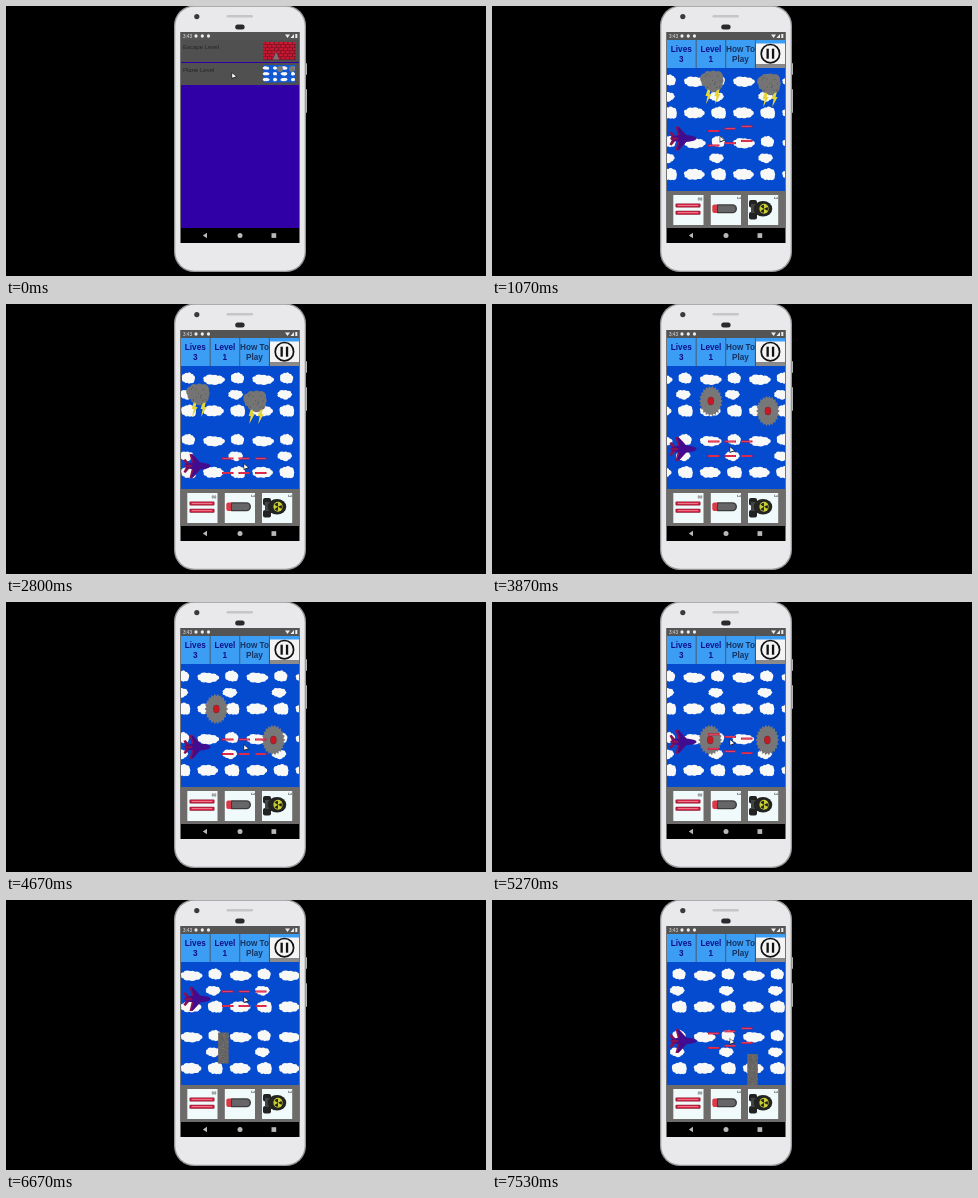
An HTML page with a canvas that plays this animation: 480x270 px, repeating every 7.59 s.

```html
<!DOCTYPE html>
<html lang="en">
<head>
<meta charset="utf-8">
<title>Plane game on a phone</title>
<style>
html, body { margin: 0; width: 100%; height: 100%; overflow: hidden; background: #000; }
canvas { display: block; }
</style>
</head>
<body>
<canvas id="stage" width="480" height="270"></canvas>
<script>
const g = document.getElementById('stage').getContext('2d');
const LOOP = 7590, START = 0.4, SPEED = 82, SPACING = 57.1, TILE = 49.1;
const TAU = Math.PI * 2;

// heights the plane flies to: [start, end, y]
const moves = [[.5, 1.9, 162], [2.9, 3.6, 145], [5.1, 5.9, 99], [6.9, 7.6, 142]];

// enemy heights in order of arrival; every four the kind changes
const heights = [80, 83, 95, 102, 97, 107, 138, 138, 148, null, 169.5];
const kinds = [storm, saw, pillar];

function ease(p) {
  p = Math.max(0, Math.min(1, p));
  return p * p * (3 - 2 * p);
}

function planeY(t) {
  return moves.reduce((y, [a, b, to]) => y + (to - y) * ease((t - a) / (b - a)), 116);
}

function random(seed) {
  const v = Math.sin(seed * 12.9898) * 43758.5453;
  return v - Math.floor(v);
}

function rect(x, y, w, h, color) {
  g.fillStyle = color;
  g.fillRect(x, y, w, h);
}

function round(x, y, w, h, r, color) {
  g.beginPath();
  g.roundRect(x, y, w, h, r);
  g.fillStyle = color;
  g.fill();
}

function oval(x, y, rx, ry, color) {
  g.beginPath();
  g.ellipse(x, y, rx, ry, 0, 0, TAU);
  g.fillStyle = color;
  g.fill();
}

function poly(color, ...p) {
  g.beginPath();
  for (let i = 0; i < p.length; i += 2) g.lineTo(p[i], p[i + 1]);
  g.closePath();
  g.fillStyle = color;
  g.fill();
}

function text(s, x, y, size, color, align = 'left', weight = '') {
  g.font = `${weight} ${size}px "Liberation Sans", Arial, sans-serif`;
  g.textAlign = align;
  g.fillStyle = color;
  g.fillText(s, x, y);
}

function at(x, y, draw) {
  g.save();
  g.translate(x, y);
  draw();
  g.restore();
}

// a ring of uneven puffs around a solid middle
function puff(x, y, w, h, seed, color = '#f8f8f6') {
  oval(x, y, w * .38, h * .36, color);
  for (let i = 0; i < 9; i++) {
    const a = i / 9 * TAU, r = .8 + .5 * random(seed * 20 + i);
    oval(x + Math.cos(a) * w * .33, y + Math.sin(a) * h * .28, w * .16 * r, h * .2 * r, color);
  }
}

function speckle(w, h, n) {
  for (let i = 0; i < n; i++)
    rect((random(i + 1) - .5) * w, (random(i + 90) - .5) * h, 1, 1, i % 2 ? '#585654' : '#7c7a78');
}

function sky(t) {
  rect(175, 62, 118, 123, '#044bd0');
  const shift = (224.3 - SPEED * (t - 1.067)) % TILE + TILE;
  for (let x = shift % TILE + TILE * 3; x < 330; x += TILE) {
    for (const y of [75, 136.5]) {
      puff(x - 22, y + .5, 22, 11, 1);
      puff(x + 2, y - 1, 13, 12, 2);
      puff(x, y + 15.5, 16, 10, 3);
      puff(x - 22.5, y + 32, 21, 12, 4);
      puff(x + 2.5, y + 32, 15, 13, 5);
    }
  }
}

function storm() {
  for (const x of [-4, 5])
    poly('#e4d63a', x, 2, x + 3, 2, x + 1.5, 8, x + 3.5, 8, x - 2, 18, x - .5, 10, x - 2.5, 10);
  puff(0, -5.4, 24, 22, 6, '#747474');
  at(0, -5.4, () => speckle(16, 14, 30));
}

function saw() {
  const teeth = 22;
  g.beginPath();
  for (let i = 0; i < teeth * 2; i++) {
    const a = i / teeth * Math.PI, r = i % 2 ? .85 : 1;
    g.lineTo(11.8 * r * Math.cos(a), 15.4 * r * Math.sin(a));
  }
  g.closePath();
  g.fillStyle = '#777';
  g.fill();
  oval(0, 0, 3.3, 4.2, '#7a3036');
  oval(0, 0, 2.7, 3.5, '#c81824');
}

function pillar() {
  rect(-5.5, -15.5, 10.5, 31, '#686664');
  speckle(9, 29, 50);
}

function plane() {
  const body = '#420c90', edge = '#8a1050';
  for (const side of [1, -1]) {
    g.save();
    g.scale(1, side);
    poly(edge, 5, 2, -4, 12, -7, 12, -4, 0);
    poly(body, 6, 1, -3.5, 11, -5, 11, -2, 0);
    poly(edge, -5, 0, -11, 7, -13, 6, -10, 0);
    g.restore();
  }
  oval(1, 0, 13, 3.4, body);
  oval(-8, 0, 4, 1.5, edge);
}

function lasers(t) {
  for (let k = 0; k < 3; k++) {
    const y = planeY(t - k * .05);
    for (const dy of [-7.5, 7]) {
      rect(216 + k * 16.5, y + dy - 1, 11.5, 2, '#d0143a');
      rect(217 + k * 16.5, y + dy - .3, 9.5, .6, '#f2607c');
    }
  }
}

function cursor(x, y) {
  at(x, y, () => {
    poly('#222', -1.4, -2, -1.4, 5, 4.2, 3);
    poly('#fff', -.8, -.8, -.8, 3.8, 3, 2.4);
  });
}

function phone() {
  round(299, 57, 2, 12, 1, '#b4b4b4');
  round(299, 83, 2, 24, 1, '#b4b4b4');
  round(168, -.5, 132, 266.5, 20, '#98989a');
  round(169.3, .7, 129.4, 264, 19, '#e9e9eb');
  round(220.5, 9, 26.5, 2.6, 1.3, '#c6c6c8');
  round(229.2, 18.5, 9.4, 5, 2.5, '#2a2a2e');
  oval(190.8, 10.6, 2.6, 2.6, '#3a3a3e');
  rect(174.5, 26, 119, 211, '#000');
}

function bars() {
  rect(175, 26, 118, 8, '#545454');
  text('3:43', 177, 32, 4.6, '#eee');
  for (const x of [190, 196.3, 202.5]) oval(x, 30, 1.6, 1.8, '#eee');
  poly('#eee', 279, 28.5, 284, 28.5, 281.5, 32);
  poly('#eee', 288, 28, 288, 32, 284.5, 32);
  rect(289.3, 28, 2, 4, '#eee');
  rect(175, 222, 118, 15, '#000');
  poly('#b8b8b8', 201, 226.7, 201, 232.3, 196.8, 229.5);
  oval(234, 229.5, 2.5, 2.5, '#b8b8b8');
  rect(265.5, 227.2, 4.7, 4.7, '#b8b8b8');
}

function menu() {
  bars();
  rect(175, 34, 118, 188, '#3000a6');
  ['Escape Level', 'Plane Level'].forEach((name, i) => {
    rect(175, 34 + i * 23, 118, 22, '#505050');
    text(name, 177, 42.5 + i * 23, 6, '#242424');
    rect(257, 36 + i * 23, 33, 17.5, i ? '#1258d2' : '#c81932');
  });
  for (let row = 0; row < 6; row++) {
    rect(257, 38.5 + row * 3, 33, .6, '#651020');
    for (let i = 0; i < 7; i++) rect(259 + i * 4.5 + row % 2 * 2, 36 + row * 3, .7, 2.5, '#651020');
  }
  poly('#777', 267, 53.5, 270, 46, 273, 53.5);
  for (let i = 0; i < 12; i++)
    puff(260 + i % 4 * 9, 62 + Math.floor(i / 4) * 5.8, i % 2 ? 4 : 7, 3.5, i);
  for (const x of [274, 286]) oval(x, 63, 3, 3, '#777');
}

function header() {
  rect(175, 34, 118, 28, '#46535f');
  ['Lives 3', 'Level 1', 'How To Play'].forEach((label, i) => {
    const x = 175 + i * 29.6, color = i < 2 ? '#0c108c' : '#173360';
    const cut = label.lastIndexOf(' ');
    rect(x, 34, 28.7, 28, '#3c9df4');
    text(label.slice(0, cut), x + 14.3, 46, 8.2, color, 'center', 'bold');
    text(label.slice(cut + 1), x + 14.3, 56.3, 8.2, color, 'center', 'bold');
  });
  rect(263.7, 34, 29.3, 4, '#3c9df4');
  rect(264, 37.5, 29, 20.8, '#f4f4f4');
  rect(264, 58.3, 29, 3.7, '#8b8b8b');
  g.beginPath();
  g.arc(278.4, 47.7, 9.2, 0, TAU);
  g.strokeStyle = '#111';
  g.lineWidth = 1.7;
  g.stroke();
  for (const x of [274.5, 279.9]) rect(x, 42.7, 2.3, 10, '#111');
}

function weapons() {
  rect(175, 185, 118, 37, '#6e6c6a');
  for (const x of [181.3, 218.8, 256]) rect(x, 189, 30.2, 30, '#f0fafa');

  for (const y of [197.5, 204.8]) {
    round(183.5, y, 25, 4, 1, '#8e1a30');
    rect(184.5, y + .7, 23, 2.4, '#e0274a');
    rect(186, y + 1.5, 20, .7, '#f596a6');
  }
  text('∞', 208, 194.5, 7, '#333', 'center');
  for (const x of [246.5, 283.5]) at(x, 192, () => {
    g.rotate(Math.PI / 2);
    text('3', 0, 1.5, 5, '#444', 'center');
  });

  round(220.3, 198.5, 7, 8.5, 2, '#d83a48');
  round(225, 198.3, 20, 9, [1, 5, 5, 1], '#3c3c3c');
  round(226, 199.5, 17.5, 6.6, [1, 4, 4, 1], '#666668');

  for (const y of [194, 206]) round(257, y, 8, 7.5, 2, '#222');
  rect(259, 198, 6, 9, '#444');
  oval(271, 202.8, 9.3, 7.8, '#222422');
  oval(272, 202.8, 4.6, 5, '#c9ce34');
  for (let i = 0; i < 3; i++) {
    g.beginPath();
    g.moveTo(272, 202.8);
    g.arc(272, 202.8, 4, i * TAU / 3 - .5, i * TAU / 3 + .5);
    g.fillStyle = '#222';
    g.fill();
  }
}

function game(t) {
  sky(t);
  const y = planeY(t);
  heights.forEach((height, slot) => {
    const x = 220 + slot * SPACING - SPEED * (t - 1.067);
    if (height && x > 186 && x < 306) at(x, height, kinds[Math.floor(slot / 4)]);
  });
  at(190.5, y, plane);
  lasers(t);
  cursor(229 + 10 * ease((t - 1) / 1.6), y - 1);
  header();
  weapons();
  bars();
}

function frame(now) {
  // the picture advances 15 times a second
  const t = Math.floor((now % LOOP) * .015 + .1) / 15;
  rect(0, 0, 480, 270, '#000');
  phone();
  g.save();
  g.beginPath();
  g.rect(175, 26, 118, 211);
  g.clip();
  if (t < START) {
    menu();
    cursor(227, 68);
  } else game(t);
  g.restore();
  requestAnimationFrame(frame);
}
requestAnimationFrame(frame);
</script>
</body>
</html>
```
